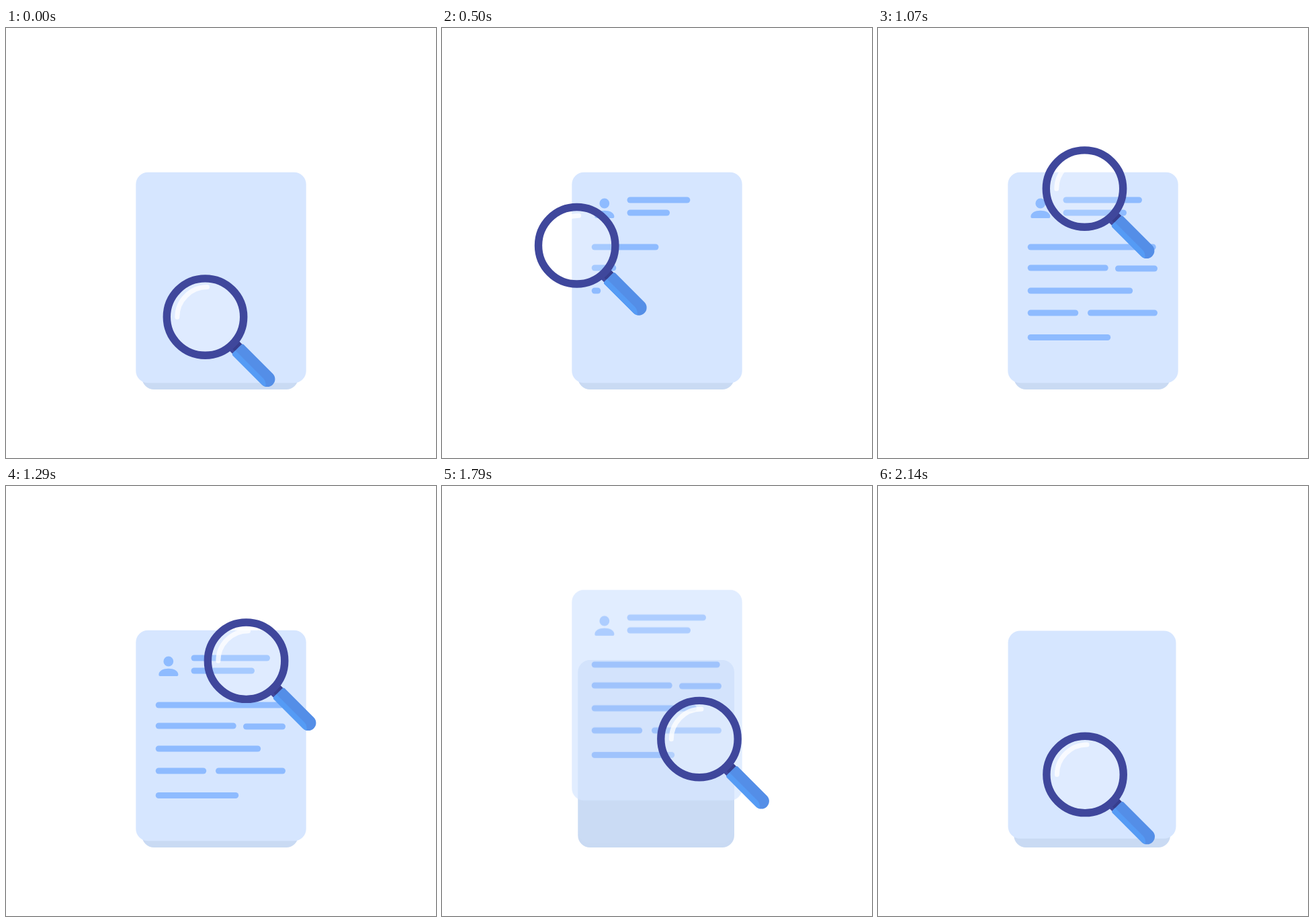
An HTML page with a canvas that plays this animation: 640 by 640 pixels, repeating every 2.21 s.

```html
<!DOCTYPE html>
<html lang="en">
<head>
<meta charset="utf-8">
<title>Document search</title>
<style>
html, body { margin: 0; width: 100%; height: 100%; overflow: hidden; background: #fff; }
canvas { display: block; width: 640px; height: 640px; }
</style>
</head>
<body>
<canvas id="stage" width="640" height="640"></canvas>
<script>
const LOOP = 2210, STEPS = 31;
const PAPER = '#d6e6ff', BACK = '#c9daf3', INK = '#8ebbff', RING = '#3f479c';
const LEFT = 193.3, TOP = 214.7, WIDTH = 253.4, HEIGHT = 313.6;

const ctx = document.getElementById('stage').getContext('2d');
const layer = document.createElement('canvas');
layer.width = layer.height = 640;
const page = layer.getContext('2d');

// Text lines: left, middle y, width, start step
const LINES = [
  [275.5, 256, 117.5, 3.6], [275.5, 275, 94.5, 4.4],
  [222.7, 326, 191, 3.8],
  [222.7, 357, 120, 5.4], [353, 358, 63, 7.7],
  [222.7, 391, 156.5, 6.4],
  [222.7, 424, 75.5, 7.05], [312, 424, 104, 7.05],
  [222.7, 460.5, 123.5, 7.9]
];

const lerp = (a, b, k) => a + (b - a) * k;
const span = (s, a, b) => Math.min(1, Math.max(0, (s - a) / (b - a)));
const ease = k => k * k * (3 - 2 * k);

function box(c, x, y, w, h, color) {
  c.fillStyle = color;
  c.beginPath();
  c.roundRect(x, y, w, h, 18);
  c.fill();
}

function person(c) {
  c.fillStyle = INK;
  c.beginPath();
  c.arc(241.8, 261, 7.4, 0, Math.PI * 2);
  c.fill();
  c.beginPath();
  c.moveTo(227.3, 281);
  c.bezierCurveTo(227.3, 275, 234, 271.8, 241.8, 271.8);
  c.bezierCurveTo(249.6, 271.8, 256.4, 275, 256.4, 281);
  c.quadraticCurveTo(256.4, 283, 254.4, 283);
  c.lineTo(229.3, 283);
  c.quadraticCurveTo(227.3, 283, 227.3, 281);
  c.fill();
}

function drawPage(s) {
  page.clearRect(0, 0, 640, 640);
  box(page, LEFT, TOP, WIDTH, HEIGHT, PAPER);
  page.globalAlpha = span(s, 1, 5);
  person(page);
  page.globalAlpha = 1;
  page.strokeStyle = INK;
  page.lineWidth = 9;
  page.lineCap = 'round';
  for (const [x, y, w, start] of LINES) {
    // Longer lines take longer to write
    const k = ease(span(s, start, start + 2.4 + 0.021 * w));
    if (!k) continue;
    page.beginPath();
    page.moveTo(x + 4.5, y);
    page.lineTo(x + 4.5 + (w - 9) * k, y);
    page.stroke();
  }
}

// Grows from the back sheet's size while its corner settles
function newSheet(s) {
  const k = span(s, 25, 31);
  const settle = 1 - (1 - k) ** 2;
  const size = lerp(0.919, 1, k);
  box(ctx, lerp(202.3, LEFT, settle), lerp(243, TOP, settle), WIDTH * size, HEIGHT * size, PAPER);
}

function handle() {
  ctx.save();
  ctx.rotate(Math.PI / 4);
  ctx.fillStyle = RING;
  ctx.fillRect(59, -10, 10, 20);
  ctx.fillStyle = '#373d8c';
  ctx.fillRect(62.5, -10, 6, 15);
  ctx.beginPath();
  ctx.roundRect(67, -11.5, 75.2, 23, [3, 11.5, 11.5, 3]);
  ctx.fillStyle = '#548ee7';
  ctx.fill();
  ctx.clip();
  ctx.fillStyle = '#559bf5';
  ctx.beginPath();
  ctx.moveTo(66, 3.5);
  ctx.lineTo(126, 3.5);
  ctx.quadraticCurveTo(134, 4, 138, 12);
  ctx.lineTo(66, 12);
  ctx.fill();
  ctx.restore();
}

// Degrees clockwise from the lowest point: a quick first quarter, then a steady turn with a slight sway
function orbit(s) {
  const first = 6.45, quarter = 8.05;
  if (s < first) return 90 * s / first;
  const sway = 1.2 * Math.sin((s - first) * Math.PI / (1.5 * quarter));
  return Math.min(360, 90 + 90 * (s - first) / quarter + sway);
}

function lens(s) {
  const a = orbit(s) * Math.PI / 180;
  ctx.save();
  ctx.translate(296.5 - 96.4 * Math.sin(a), 334.3 + 95.8 * Math.cos(a));
  handle();
  ctx.beginPath();
  ctx.arc(0, 0, 57.2, 0, Math.PI * 2);
  ctx.fillStyle = 'rgba(255,255,255,0.21)';
  ctx.fill();
  ctx.lineWidth = 11.4;
  ctx.strokeStyle = RING;
  ctx.stroke();
  ctx.beginPath();
  ctx.arc(3, 0.2, 44.7, Math.PI, Math.PI * 1.5);
  ctx.lineWidth = 7;
  ctx.lineCap = 'round';
  ctx.strokeStyle = 'rgba(255,255,255,0.78)';
  ctx.stroke();
  ctx.restore();
}

function draw(s) {
  ctx.fillStyle = '#fff';
  ctx.fillRect(0, 0, 640, 640);
  box(ctx, 202.3, 259, 232.7, 279, BACK);

  ctx.globalAlpha = span(s, 24.8, 28);
  newSheet(s);

  ctx.globalAlpha = 1 - span(s, 24.1, 27.4);
  drawPage(s);
  ctx.drawImage(layer, 0, -124.4 * ease(span(s, 22.7, 27.4)));

  ctx.globalAlpha = 1;
  lens(s);
}

const begin = performance.now();
function tick() {
  const t = (performance.now() - begin) % LOOP;
  draw(Math.floor((t + 2) * STEPS / LOOP) % STEPS);
  requestAnimationFrame(tick);
}
tick();
</script>
</body>
</html>
```
